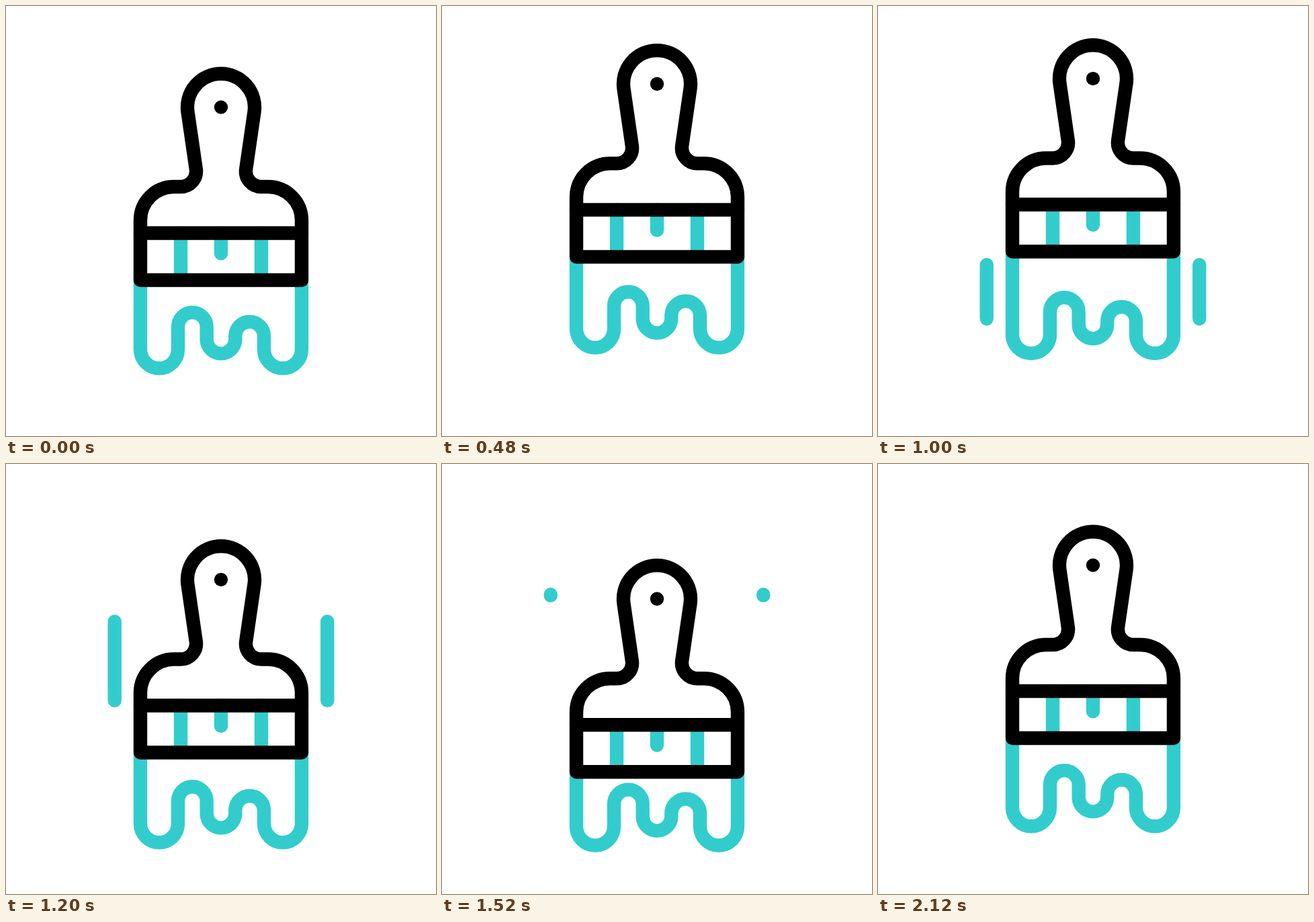
An HTML page that plays this animation: 640x640 px, repeating every 2400 ms.

```html
<!DOCTYPE html>
<html lang="en">
<head>
<meta charset="utf-8">
<title>Paint brush</title>
<style>
html, body { margin: 0; height: 100%; overflow: hidden; background: #fff; }
svg { display: block; width: 100%; height: 100%; }
path { fill: none; stroke-width: 20.4; stroke-linejoin: round; stroke-linecap: round; }
.paint { stroke: #3cc; }
.frame { stroke: #000; }
</style>
</head>
<body>
<svg viewBox="0 0 640 640">
  <path id="bristles" class="paint"/>
  <path id="dashes" class="paint"/>
  <g id="brush">
    <path class="paint" d="M260 338V398M380 338V398M320 338V368.4"/>
    <path class="frame" d="M200 338V319A50 50 0 0 1 250 269H260A23 23 0 0 0 282.8 242.6L270.5 157.8
      A50 50 0 1 1 369.5 157.8L357.2 242.6A23 23 0 0 0 380 269H390A50 50 0 0 1 440 319V338"/>
    <path class="frame" d="M200 338H440V408H200Z"/>
    <circle cx="320" cy="150.6" r="10.2"/>
  </g>
</svg>
<script>
const LOOP = 2400, STEP = 40;
const [bristles, dashes, brush] = ['bristles', 'dashes', 'brush'].map(id => document.getElementById(id));

// Eased progress from time a to time b
function ease(t, a, b) {
  const p = Math.min(1, Math.max(0, (t - a) / (b - a)));
  return p * p * (3 - 2 * p);
}

// Up, down and back to rest, 600 ms each
function swing(t, start, first, second) {
  return first * ease(t, start, start + 600)
    + (second - first) * ease(t, start + 600, start + 1200)
    - second * ease(t, start + 1200, start + 1800);
}

function bristlePath(top, shift) {
  const y = v => v + shift;
  const arc = (r, sweep, x, v) => `V${y(v)}A${r} ${r} 0 0 ${sweep} ${x} ${y(v)}`;
  return `M200 ${top}` + arc(28, 0, 256, 511.3) + arc(21.35, 1, 298.7, 477.5)
    + arc(21.35, 0, 341.3, 497.5) + arc(21.35, 1, 384, 491.3)
    + arc(28, 0, 440, 511.3) + `V${top}`;
}

function draw(t) {
  const lift = swing(t, 200, -77, 56);
  const stretch = swing(t, 320, 22.4, -21.7);
  brush.setAttribute('transform', `translate(0 ${lift})`);
  bristles.setAttribute('d', bristlePath(408 + lift, lift + stretch));

  const head = 480.5 - 286.2 * ease(t, 795, 1325);
  const tail = 480.5 - 284.8 * ease(t, 915, 1525);
  const shown = t >= 760 && t < 1560;
  dashes.setAttribute('d', shown ? `M161.7 ${tail}V${head}M478.3 ${tail}V${head}` : '');
}

const begin = performance.now();
function tick() {
  const t = (performance.now() - begin) % LOOP;
  draw(Math.floor(t / STEP) * STEP);
  requestAnimationFrame(tick);
}
tick();
</script>
</body>
</html>
```
